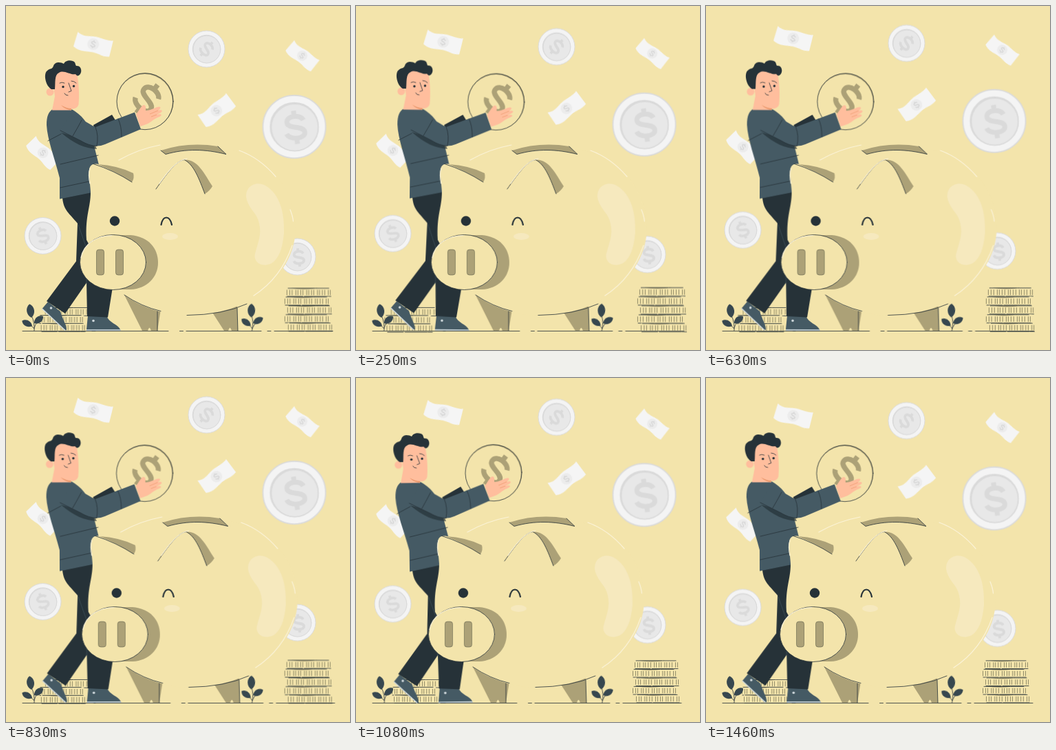
An HTML page for the animation above (1.5 s loop, 500x500 px).

```html
<!DOCTYPE html>
<html lang="en">
<head>
<meta charset="utf-8">
<title>Savings</title>
<style>
  :root { --bg: #f3e4ab; --tan: #aca177; --ink: #263238; --suit: #455a64; --skin: #ffbe9d; --blush: #eb996e; }
  html, body { margin: 0; width: 100%; height: 100%; overflow: hidden; background: var(--bg); }
  svg { display: block; width: 100vw; height: 100vh; }
  .bg { fill: var(--bg); }
  .tan { fill: var(--tan); }
  .ink { fill: var(--ink); }
  .suit { fill: var(--suit); }
  .skin { fill: var(--skin); }
  .glow { fill: #f6e9be; }
  .line { fill: none; stroke: var(--ink); stroke-width: .8; stroke-linecap: round; stroke-linejoin: round; }
  .shine { fill: none; stroke: #fbf3d8; stroke-width: 1.2; stroke-linecap: round; }
  .float { animation: float 1.5s linear infinite; }
  .sway { animation: sway 1.5s linear infinite; }
  .shake { animation: shake 1.5s ease infinite; }
  .beat { transform-origin: 261px 441px; animation: beat 1.5s linear infinite; }
  @keyframes float { 50% { transform: translateY(-10px); } }
  @keyframes sway {
    25% { transform: rotate(1deg); }
    75% { transform: rotate(-1deg); }
  }
  @keyframes shake {
    0%, 100% { transform: translateX(0); }
    10%, 90% { transform: translateX(-1px); }
    20%, 80% { transform: translateX(2px); }
    30%, 50%, 70% { transform: translateX(-4px); }
    40%, 60% { transform: translateX(4px); }
  }
  @keyframes beat {
    0%, 100% { transform: scale(1.02); }
    9%, 48.5% { transform: scale(1.09); }
    16.7% { transform: scale(1.05); }
    28% { transform: scale(1.005); }
    34%, 37.5%, 60%, 97.5% { transform: scale(1); }
    42% { transform: scale(1.035); }
    55.3% { transform: scale(1.02); }
  }
</style>
</head>
<body>
<svg viewBox="0 0 500 500">
  <defs>
    <path id="dollar" fill="none" stroke-width="6"
      d="M11,-8 C8,-16 -10,-16 -10,-7 C-10,2 11,-2 11,7.500 C11,16 -9,16 -12,7 M0,-21 V-13 M0,13 V21"/>
    <g id="coin">
      <circle r="26.5" fill="#f4f4f4"/>
      <circle r="20.200" fill="#dfdfdf"/>
      <circle cx=".4" cy=".5" r="19.900" fill="#e8e8e8"/>
    </g>
    <g id="bill">
      <path fill="#f5f5f5" d="M-26,-13 C-15,-7 -8,-12 2,-12.500 C12,-13 18,-10 27,-13 L27,11 C18,14 11,10 2,10.500 C-8,11 -17,15 -27,9 Z"/>
      <circle r="8.500" cy="-1" fill="#ececec"/>
      <use href="#dollar" transform="translate(0 -1) scale(.27)" stroke="#d8d8d8"/>
    </g>
    <g id="slab">
      <rect class="bg" width="64" height="12.5"/>
      <path class="tan" d="M6,0 H45 Q24,4 6,0 Z"/>
      <path class="line" stroke-dasharray="38 1 19 2" d="M2,.4 H62"/>
      <path class="line" stroke-dasharray="22 2 31 1" d="M1,12 H63"/>
      <path d="M0,6.5 H65" fill="none" stroke="#55553f" stroke-width="7.500" stroke-dasharray=".6 3.4 .6 2.800 .6 4.600 .6 2.300"/>
    </g>
    <path id="leaf" d="M0,0 C-7.500,-5 -7,-16 0,-20 C7,-16 7.500,-5 0,0 Z"/>
    <g id="plant" fill="#37474f">
      <path class="line" stroke="#37474f" d="M0,0 Q1,-12 -4,-22 M0,-4 Q1,-9 5,-13 M0,-3 Q-2,-6 -6,-8"/>
      <use href="#leaf" transform="translate(-4 -19) rotate(-8)"/>
      <use href="#leaf" transform="translate(0 -11) rotate(52) scale(.82)"/>
      <use href="#leaf" transform="translate(-3 -7) rotate(-63) scale(.82)"/>
    </g>
  </defs>

  <rect class="bg" width="500" height="500"/>

  <g class="float">
    <use href="#bill" transform="translate(126.500 56.500) rotate(14)"/>
    <use href="#bill" transform="translate(430 73) rotate(38) scale(.88)"/>
    <use href="#bill" transform="translate(306.500 153) rotate(-37) scale(.98)"/>
    <use href="#bill" transform="translate(53 214) rotate(43) scale(.92)"/>
    <g stroke="#dadada">
      <g transform="translate(291.500 62.500)"><use href="#coin"/><use href="#dollar" transform="rotate(42) scale(.62)"/></g>
      <g transform="translate(53.500 334)"><use href="#coin"/><use href="#dollar" transform="rotate(-22) scale(.62)"/></g>
      <g transform="translate(423.500 364.500)"><use href="#coin"/><use href="#dollar" transform="translate(2 1) rotate(-7) scale(.64)"/></g>
      <g transform="translate(419 175.500) scale(1.72)"><use href="#coin"/><use href="#dollar" transform="translate(1 .5) rotate(-7) scale(.67)"/></g>
    </g>
  </g>

  <g class="beat">
    <use href="#slab" x="61" y="438"/>
    <use href="#slab" x="52" y="449"/>
    <use href="#slab" x="55" y="460.500"/>
    <use href="#slab" x="405" y="410.500"/>
    <use href="#slab" x="402" y="423"/>
    <use href="#slab" x="406" y="435.500"/>
    <use href="#slab" x="402" y="448"/>
    <use href="#slab" x="407" y="460"/>
  </g>

  <path class="line" d="M24,472.500 H130"/>
  <g class="sway" style="transform-origin: 39px 453px"><use href="#plant" x="41" y="472"/></g>

  <g class="sway" style="transform-origin: 148px 277px">
    <path class="suit" d="M61,430 L52.500,440 L85,471 L88,471 C88,462 83,458 79,444 Z"/>
    <path d="M52.500,440 L86,471.500" stroke="#cfd8dc" stroke-width="1.600"/>
    <circle cx="65.500" cy="439" r="1.800" fill="#cfd8dc"/>
    <path class="suit" d="M119,450 H146 C150,461 162,462 166,470 H117 Z"/>
    <path d="M117,471 H166.500" stroke="#b0bec5" stroke-width="2"/>
    <circle cx="127" cy="457.500" r="1.800" fill="#cfd8dc"/>
    <path class="ink" d="M82,279 L126,270 L130,310 L120,398 L86,447 L59,429 L102,371 L104,316 C92,301 84,298 82,279 Z"/>
    <path class="ink" d="M106,310 L117,400 L118,451 L148,452.500 L158,390 L130,290 Z"/>
    <path d="M105,318 L117,352 V404" fill="none" stroke="#455a64" stroke-width=".6"/>

    <path class="ink" d="M127,173 L154,158 L159,166 L130,186 Z"/>
    <path class="suit" d="M67,150.500 L96,150.500 C108,157 122,170 126,195 L135,231 L140,268 L78,280.500 L78,250 C71,222 60,194 59,173 C59,160 62,154 67,150.500 Z"/>
    <path class="ink" d="M80,184 L128,198 L132,208 C115,207 98,200 80,184 Z" opacity=".7"/>
    <path class="line" d="M79,230 L134,217 M79,264 L130,253 M61,196 L80,186"/>

    <path class="skin" d="M66,94 H102 C106,108 107,132 105.500,143 C104,149 98,150 95,149.500 V151.500 H67 L71,131 Z"/>
    <circle class="skin" cx="64" cy="125" r="5.500"/>
    <path fill="var(--blush)" d="M80,144 Q88,149 95,149 V151.500 Q85,150 80,144 Z"/>
    <path class="ink" d="M66,121 C57,116 54,98 60,94 C64,90 67,93 69,87 C72,80 80,82 84,84 C86,78 97,78 100,82 C101,84 101,86 102,87 C110,86 111,96 107,100 C105,102 103,102 101,99 C94,101 84,92 77,97 C70,100 72,112 71,121 Z"/>
    <circle class="ink" cx="83" cy="117.500" r="1.700"/>
    <circle class="ink" cx="98.500" cy="116.500" r="1.700"/>
    <path class="line" d="M78,112 Q81,110 85,112 M95,109 Q99,109 102,112 M91,112 L95,123.500 L91,125 M85,127 Q86,130 90,130"/>

    <circle class="tan" cx="202.600" cy="138.200" r="41"/>
    <circle class="bg" cx="201.700" cy="139.300" r="40.200"/>
    <circle class="line" cx="202" cy="138.700" r="41"/>
    <use href="#dollar" transform="translate(205 135) rotate(37) scale(1.22)" stroke="var(--tan)"/>
    <path class="skin" d="M189,157 C194,152 197,143 201,144 C204,145 203,150 203,152 C211,152 219,146 223,146.500 C226,147 224,150 221,152 C226,150 229,152 225,155 L219,158 C226,156 228,159 223,161 C218,163 214,165 211,168 C206,172 200,173 195,175 Z"/>
    <path d="M221,152 L209,157 M219,158 L211,161" stroke="var(--blush)" stroke-width=".7"/>
    <path class="suit" d="M92,160 C108,161 119,171 130,176 L187,154.500 L196,179 L144,201 C132,206 121,203 109,196 L79,181 Z"/>
    <path class="line" d="M110,166 Q103,179 97,189 M130,176 Q135,189 132,203 M163,164 Q168,174 168,190 M79,181 L109,196 Q120,203 132,203.500"/>
  </g>

  <g class="shake">
    <path class="tan" d="M171,418 L198,472 H220 L225,441 Z"/>
    <path class="tan" d="M299,444 L317,472 H337 L336,436 Z"/>
    <path class="bg" d="M206,472.500 Q208.500,463 211,472.500 Z M323,472.500 Q325.500,463 328,472.500 Z"/>
    <path class="bg" d="M117,340 C115,303 123,294 123,270 C122,255 119,240 122,234 C125,228 131,229 140,231 C180,215 225,201 270,202 C335,203 372,222 396,251 C412,270 421,296 421,324 C420,367 393,401 360,423 C342,438 305,449 263,450 C238,450 198,440 172,420 L150,400 Z"/>
    <path class="shine" d="M164,224 Q192,208 224,202 M339,210 Q369,221 392,248 M413,296 Q417,306 417.500,313 M416,348 Q400,395 360,421 M122,236 Q119,245 122,258"/>
    <path class="line" d="M172,420 Q197,437 225,443.500 M263,449.500 Q315,449 350,433 M220,444 V472 M336,439 L337,472"/>

    <path class="tan" d="M225,210 Q265,197 308,204 L320,215.500 C290,208 262,207 232,215.500 Z"/>
    <path class="line" d="M225,210 L232,215.500 C262,207 290,208 320,215.500 L308,204"/>
    <path class="tan" d="M133,230 Q163,232 185,243 Q187,250 183,256 Q160,241 133,230 Z"/>
    <path class="line" d="M127,229.500 Q157,239 183,256"/>
    <path class="tan" d="M259,223.500 C278,222 288,243 300,262 Q296,269 289,273 C281,252 273,230 259,223.500 Z"/>
    <path class="line" d="M218,266 C232,246 247,225 259,223.500 C273,230 281,252 289,273"/>
    <path class="shine" d="M223,258 C235,241 248,224 263,222"/>

    <path class="glow" d="M350,282 C345,264 362,253 377,261 C399,274 405,302 404,330 C402,353 396,368 386,374 C372,381 359,372 362,360 C366,344 372,333 368,316 C365,301 354,296 350,282 Z"/>
    <ellipse class="glow" cx="238.500" cy="335" rx="11.500" ry="5"/>
    <circle class="ink" cx="158" cy="312.500" r="7.200"/>
    <path class="line" style="stroke-width: 2.200" d="M225.500,318 C228,304 238,304 241,318"/>

    <path class="tan" d="M155,333 H181 C207,335 221,352 221,373 C221,394 205,411 181,412 H155 Z"/>
    <ellipse class="bg" cx="155.500" cy="372.500" rx="48" ry="40"/>
    <ellipse class="line" cx="155.500" cy="372.500" rx="48" ry="40"/>
    <path class="shine" d="M109,366 C113,345 132,334 154,333.500"/>
    <g class="tan" stroke="#4b4c3c" stroke-width=".5">
      <rect x="131.500" y="354" width="11" height="37" rx="3.500"/>
      <rect x="159.500" y="354" width="11" height="37" rx="3.500"/>
    </g>
    <path class="line" d="M125,472.500 H236 M252.500,472.500 H257.500 M262,472.500 H371 M380,472.500 H385 M390,472.500 H475"/>
  </g>

  <g class="sway" style="transform-origin: 358px 452px"><use href="#plant" transform="translate(357.500 472) rotate(9)"/></g>
</svg>
</body>
</html>
```
